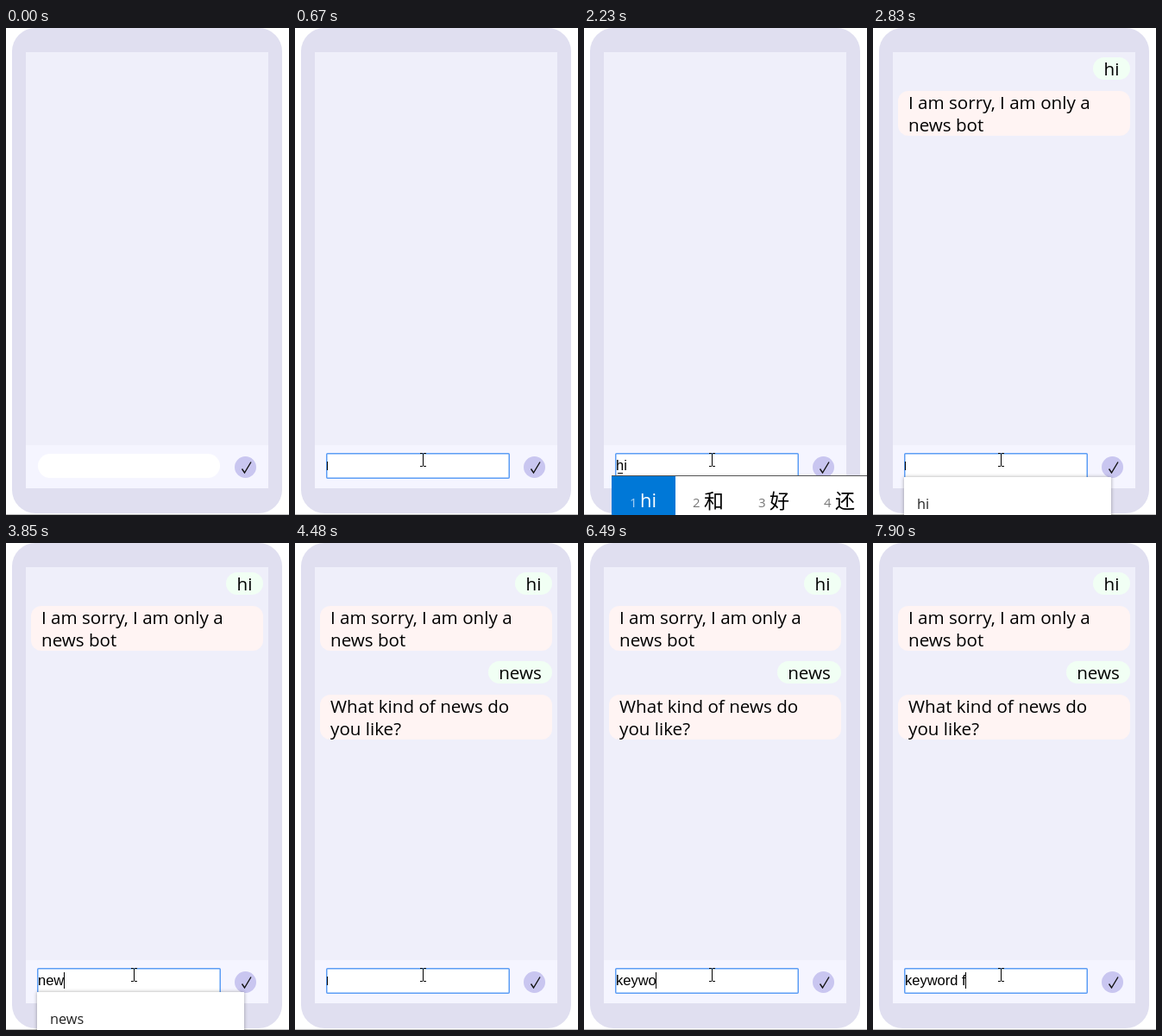
These frames come from a looping animation (328 by 565 pixels, 8000 ms). An HTML page with a canvas:

```html
<!DOCTYPE html>
<html lang="en">
<head>
<meta charset="utf-8">
<title>News bot chat</title>
<style>
  html, body { margin: 0; width: 100%; height: 100%; overflow: hidden; background: #fff; }
  canvas { display: block; width: 328px; height: 565px; }
</style>
</head>
<body>
<canvas width="328" height="565"></canvas>
<script>
const LOOP = 8000;
const UI_FONT = '"Open Sans", "Noto Sans", sans-serif';
const INPUT_FONT = '16.5px "Liberation Sans", Arial, sans-serif';
const INPUT_X = 37;
const ctx = document.querySelector('canvas').getContext('2d');

// Each step changes only the properties it names.
const steps = [
  [0, { text: '', pointer: null, focused: false, caret: false, suggestion: '', composing: false, candidates: false, turns: 0 }],
  [70, { pointer: ['beam', 184, 504] }],
  [130, { pointer: ['arrow', 174, 481] }],
  [280, { pointer: ['beam', 164, 498] }],
  [360, { pointer: ['beam', 152, 500] }],
  [440, { pointer: ['beam', 148, 501] }],
  [670, { focused: true, caret: true }],
  [770, { suggestion: 'hi' }],
  [1220, { caret: false }],
  [1600, { text: 'h', composing: true, caret: true }],
  [1690, { text: 'hi', candidates: true }],
  [2230, { caret: false }],
  [2370, { composing: false, candidates: false, caret: true }],
  [2830, { text: '', turns: 1 }],
  [3380, { caret: false }],
  [3700, { text: 'n', suggestion: 'news', caret: true }],
  [3770, { text: 'ne' }],
  [3850, { text: 'new' }],
  [4100, { text: 'news', suggestion: '' }],
  [4480, { text: '', turns: 2 }],
  [5020, { caret: false }],
  [5570, { caret: true }],
  [5720, { text: 'k', suggestion: 'keras.models.Model' }],
  [5810, { text: 'ke' }],
  [5950, { text: 'key', suggestion: '' }],
  [6340, { text: 'keyw' }],
  [6490, { text: 'keywo' }],
  [6660, { text: 'keywor' }],
  [7190, { caret: false }],
  [7440, { text: 'keyword', caret: true }],
  [7650, { text: 'keyword ' }],
  [7900, { text: 'keyword f' }]
];

const turns = [
  { y: 34, user: 'hi', left: 255, reply: ['I am sorry, I am only a', 'news bot'] },
  { y: 137, user: 'news', left: 224, reply: ['What kind of news do', 'you like?'] }
];

function stateAt(time) {
  return Object.assign({}, ...steps.filter(([start]) => start <= time).map(([, change]) => change));
}

function rect(x, y, w, h, color) {
  ctx.fillStyle = color;
  ctx.fillRect(x, y, w, h);
}

function rounded(x, y, w, h, radius, color) {
  ctx.fillStyle = color;
  ctx.beginPath();
  ctx.roundRect(x, y, w, h, radius);
  ctx.fill();
}

function label(text, x, y, font, color = '#000', align = 'left') {
  ctx.font = font;
  ctx.fillStyle = color;
  ctx.textAlign = align;
  ctx.fillText(text, x, y);
}

function polyline(points, color, width) {
  ctx.beginPath();
  points.forEach(([x, y]) => ctx.lineTo(x, y));
  ctx.strokeStyle = color;
  ctx.lineWidth = width;
  ctx.stroke();
}

function drawPhone() {
  rect(0, 0, 328, 565, '#fff');
  rect(0, 564, 328, 1, '#bdbdbd');
  rounded(7, 0, 313, 563, 27, '#e0dff0');
  rect(23, 28, 281, 506, '#efeffa');
  rect(23, 484, 281, 50, '#f5f5ff');
  rounded(265, 497, 25, 25, 12.5, '#c9c6f0');
  polyline([[273.5, 511.5], [276.5, 516], [284, 503.5]], '#111', 1.4);
}

function drawTurn({ y, user, left, reply }) {
  const font = `20.6px ${UI_FONT}`;
  rounded(left, y, 298 - left, 26, 13, '#f1fff4');
  label(user, (left + 298) / 2, y + 21, font, '#000', 'center');
  rounded(29, y + 39, 269, 52, 12, '#fff4f3');
  reply.forEach((line, i) => label(line, 41, y + 60 + 26 * i, font));
}

function drawInput({ focused, text, caret, composing }) {
  if (!focused) {
    rounded(37, 494, 211, 28, 14, '#fff');
    return;
  }
  rect(37, 494, 211, 28, '#fff');
  ctx.strokeStyle = '#5c9df5';
  ctx.lineWidth = 1.5;
  ctx.beginPath();
  ctx.roundRect(36.75, 493.75, 211.5, 28.5, 1);
  ctx.stroke();
  label(text, INPUT_X, 513, INPUT_FONT);
  const endOf = count => Math.floor(INPUT_X + ctx.measureText(text.slice(0, count)).width);
  if (composing) {
    for (let i = 0; i < text.length; i++) {
      rect(endOf(i) + 2, 516, endOf(i + 1) - endOf(i) - 3, 1, '#000');
    }
  }
  if (caret) {
    if (text) rect(endOf(text.length), 498, 1, 19, '#000');
    else rect(37, 503, 1, 10, '#000');
  }
}

function drawSuggestion(text) {
  ctx.save();
  ctx.shadowColor = 'rgba(0,0,0,.35)';
  ctx.shadowBlur = 4;
  rect(36, 521, 240, 60, '#fff');
  ctx.restore();
  label(text, 51, 557.5, `16.3px ${UI_FONT}`, '#222');
}

function drawCandidates() {
  rect(32, 519, 296, 46, '#fff');
  rect(32, 519, 296, 1, '#555');
  rect(32, 520, 74, 45, '#0078d7');
  ['hi', '和', '好', '还'].forEach((word, i) => {
    const x = i ? 50 + 76 * i : 53;
    label(i + 1, x, 556, `15px ${UI_FONT}`, i ? '#777' : '#a9d2f3');
    if (i) label(word, x + 13, 557, '23px "Noto Sans CJK SC", "Noto Sans CJK", sans-serif');
    else label(word, x + 12, 556, `22px ${UI_FONT}`, '#fff');
  });
}

function drawPointer([kind, x, y]) {
  if (kind === 'beam') {
    rect(x, y - 7, 1, 14, '#000');
    for (const edge of [y - 8, y + 7]) {
      rect(x - 3, edge, 3, 1, '#000');
      rect(x + 1, edge, 3, 1, '#000');
    }
    return;
  }
  const outline = [[0, 0], [0, 16], [4, 13], [7, 19], [9, 18], [7, 12], [11, 12], [0, 0]];
  polyline(outline.map(([dx, dy]) => [x + dx + .5, y + dy + .5]), '#000', 1);
  ctx.fillStyle = '#fff';
  ctx.fill();
}

function draw(now) {
  const state = stateAt(now % LOOP);
  drawPhone();
  turns.slice(0, state.turns).forEach(drawTurn);
  drawInput(state);
  if (state.suggestion) drawSuggestion(state.suggestion);
  if (state.candidates) drawCandidates();
  if (state.pointer) drawPointer(state.pointer);
}

const start = performance.now();
function tick() {
  draw(performance.now() - start);
  requestAnimationFrame(tick);
}
tick();
</script>
</body>
</html>
```
